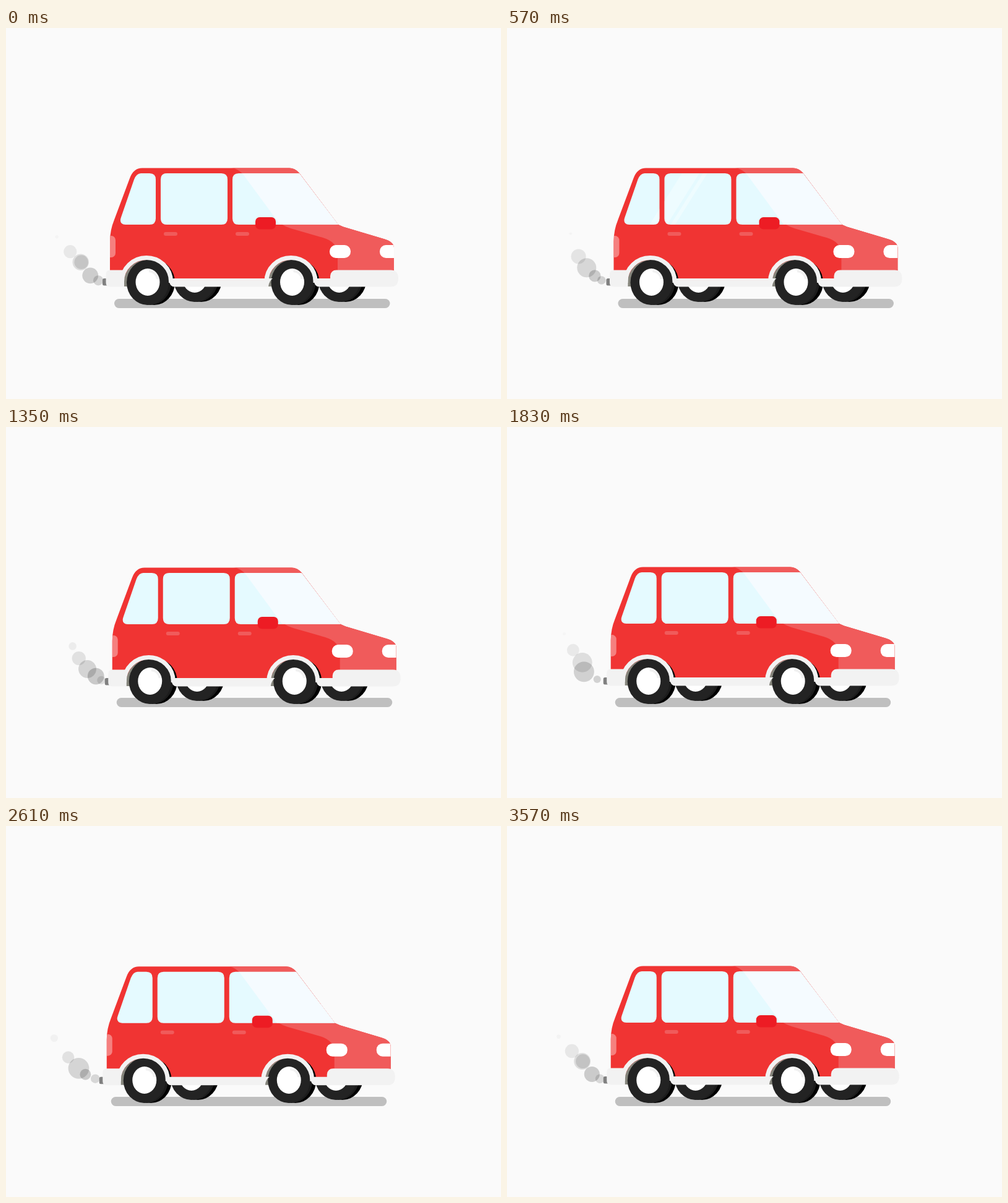
Recreate the animation shown at these times as an HTML page. Size 800 by 600 pixels, loop 3.6 s.

```html
<!DOCTYPE html>
<html lang="en">
<head>
<meta charset="utf-8">
<title>Red car</title>
<style>
  html, body { margin: 0; width: 100%; height: 100%; overflow: hidden; background: #fafafa; }
  svg { display: block; width: 800px; height: 600px; }
</style>
</head>
<body>
<svg viewBox="0 0 800 600">
  <defs>
    <g id="wheel">
      <ellipse cx="239.5" cy="411.5" rx="33.5" ry="36.5"/>
      <ellipse cx="233" cy="411.5" rx="34" ry="36.5" fill="#1c1c1c"/>
      <ellipse cx="229" cy="411.5" rx="34" ry="36.5" fill="#232323"/>
      <ellipse cx="229" cy="411" rx="19.5" ry="22" fill="#fff"/>
      <path d="M231 393Q243 394 245 406" fill="none" stroke="#f1f1f1" stroke-width="4"/>
    </g>
    <ellipse id="well" cx="227" cy="413" rx="37" ry="38" fill="#85857c"/>
    <path id="arch" d="M187.500 412V410A39.500 38.500 0 0 1 266.500 410V412" fill="none" stroke="#f2f2f2" stroke-width="7"/>
    <rect id="handle" x="255" y="330" width="22" height="6" rx="3" fill="#f05b5b"/>
    <path id="shell" d="M168 406V345Q168 327 175 310L200 243Q206 226.500 220 226.500H458Q467 226.500 474 234.500L537 318L545 321.500L612 341.500Q627 346 627 356V406Z"/>
    <path id="windows" d="M218 235H232Q242 235 242 245V308Q242 318 232 318H193Q182 317 186 306L207 245Q211 235 218 235Z
      M260 235H348Q358 235 358 245V308Q358 318 348 318H260Q250 318 250 308V245Q250 235 260 235Z
      M376 235H474L537 318H376Q366 318 366 308V245Q366 235 376 235Z"/>
    <clipPath id="inShell"><use href="#shell"/></clipPath>
    <clipPath id="inWindows"><use href="#windows"/></clipPath>
    <clipPath id="aboveSill"><rect x="160" y="360" width="480" height="58"/></clipPath>
  </defs>
  <g id="car">
    <rect x="175" y="438" width="445.500" height="15" rx="7.500" fill="#bfbfbf"/>
    <g id="smoke"></g>
    <use href="#wheel" x="76" y="-5"/>
    <use href="#wheel" x="309.500" y="-5"/>
    <g class="bob">
      <rect x="156" y="405" width="10" height="11.500" rx="2.500" fill="#808080"/>
      <use href="#shell" fill="#f03433"/>
      <g clip-path="url(#inShell)">
        <path d="M364 226Q377 228 385 239L437 309Q444 319 460 324L512 339Q536 346 536 366V406H640V220Z" fill="#f05b5b"/>
        <rect x="158" y="336" width="19" height="35" rx="7" fill="#f5807f"/>
        <rect x="604" y="351" width="40" height="21" rx="10" fill="#fff"/>
      </g>
      <rect x="523" y="351" width="34" height="21" rx="10" fill="#fff"/>
      <use href="#windows" fill="#e5faff"/>
      <g clip-path="url(#inWindows)">
        <path d="M382 235L443 318H540V235Z" fill="#f5fbff"/>
        <path id="glint" d="M16 230H44L-14 322H-42ZM50 230H57L-1 322H-8Z" fill="#fff" opacity=".35"/>
      </g>
      <rect x="403" y="306" width="33" height="19.500" rx="7" fill="#ed1c24"/>
      <use href="#handle"/>
      <use href="#handle" x="116"/>
      <g clip-path="url(#aboveSill)">
        <use href="#well"/>
        <use href="#well" x="233.500"/>
      </g>
    </g>
    <use href="#wheel"/>
    <use href="#wheel" x="233.500"/>
    <g class="bob" fill="#f2f2f2">
      <use href="#arch"/>
      <use href="#arch" x="233.500"/>
      <path d="M168 391.500H191V418.500H168Q161.500 418.500 161.500 412V398Q161.500 391.500 168 391.500Z"/>
      <path d="M263 405H431Q425 409 424 418.500H272Q264 418.500 263 405Z"/>
      <path d="M497 405H524V401Q525 391.500 534 391.500H622Q634 391.500 634 405Q634 418.500 622 418.500H506Q498 418.500 497 405Z"/>
    </g>
  </g>
</svg>
<script>
const LOOP = 3600, LIFE = 1680;
const $ = id => document.getElementById(id);
const bobs = document.querySelectorAll('.bob');

// Each puff: birth time, leftward speed (px/ms), largest radius
const puffs = [
  [0, .043, 11], [260, .044, 12.5], [557, .0431, 14.5], [845, .0405, 16.5],
  [1131, .0533, 17], [1520, .0515, 11], [1825, .05, 17], [2065, .052, 10.5],
  [2340, .0462, 15], [2580, .0405, 14], [2580, .0395, 12], [3015, .044, 14.5],
  [3305, .0435, 15.5]
].map(([birth, speed, size]) => {
  const el = document.createElementNS('http://www.w3.org/2000/svg', 'circle');
  $('smoke').append(el);
  return { el, birth, speed, size };
});

function drawPuff({ el, birth, speed, size }, t) {
  const age = (t - birth + LOOP) % LOOP;
  const u = Math.min(age / LIFE, 1);
  el.setAttribute('cx', 162 - speed * age);
  el.setAttribute('cy', 411 - 3.1e-5 * age * age);
  el.setAttribute('r', Math.max(0, size * Math.sin(Math.PI * u)));
  el.setAttribute('opacity', .21 * Math.min(u / .25, (1 - u) / .75));
}

function draw(now) {
  const t = now % LOOP, turn = 2 * Math.PI * t;
  const sway = 5.3 * Math.sin(turn / LOOP);
  const bob = (1 - Math.cos(turn / 300)) / 2;
  $('car').setAttribute('transform', `translate(${sway} 0)`);
  bobs.forEach(g => g.setAttribute('transform', `translate(0 ${bob})`));
  $('glint').setAttribute('transform', `translate(${265 + (t - 570) * .47} 0)`);
  puffs.forEach(p => drawPuff(p, t));
}

const start = performance.now();
function tick() {
  draw(performance.now() - start);
  requestAnimationFrame(tick);
}
tick();
</script>
</body>
</html>
```
